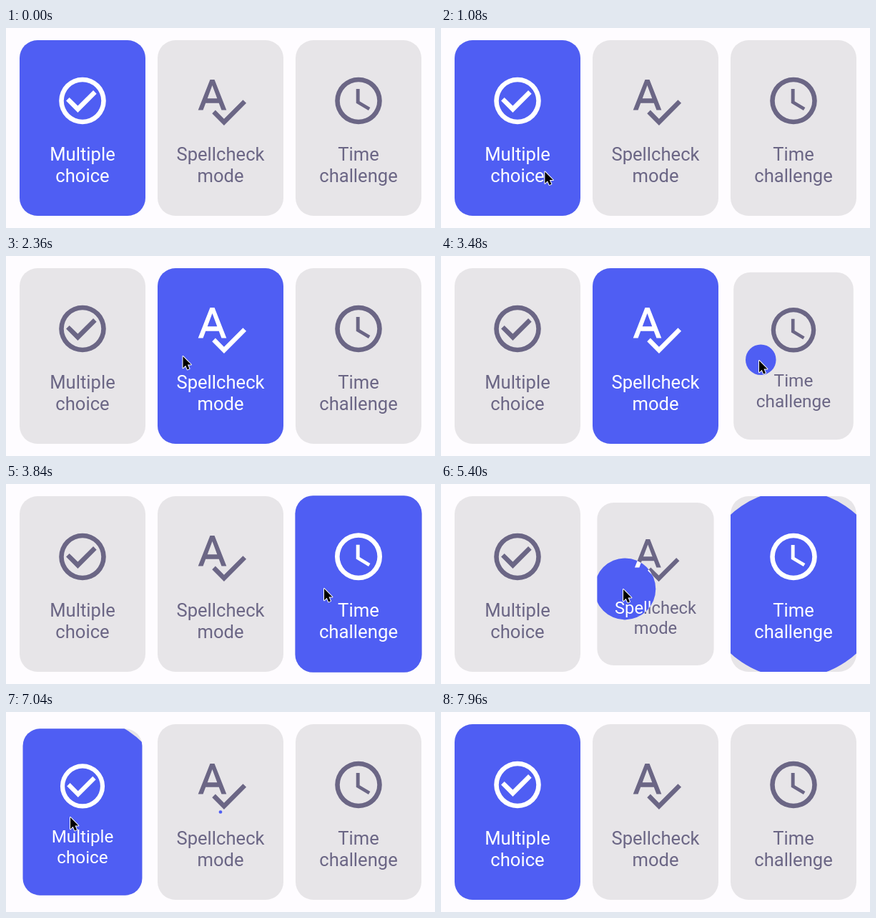
These frames come from a looping animation (600 by 279 pixels, 8.52 s). An HTML page:

```html
<!DOCTYPE html>
<html lang="en">
<head>
<meta charset="utf-8">
<title>Mode picker</title>
<style>
  html, body { margin: 0; width: 100%; height: 100%; overflow: hidden; background: #fefcff; }
  svg { display: block; width: 100%; height: 100%; }
  text { font: 25.6px Roboto, sans-serif; text-anchor: middle; }
  .idle { fill: #6b6685; }
  .idle rect { fill: #e7e5e8; }
  .active { fill: #fff; }
  .active rect { fill: #4f5ef3; }
</style>
</head>
<body>
<svg id="stage" viewBox="0 0 600 279">
  <g id="cards"></g>
  <path id="cursor" d="M0 0V16.2L3.7 12.7 6.2 18.4 9 17.2 6.5 11.6H11.4Z"
        fill="#000" stroke="#fff" stroke-width="2" paint-order="stroke" stroke-linejoin="round"/>
</svg>
<script>
const LOOP = 8520, STEP = 40;
const WIDTH = 176, HEIGHT = 245, MID_Y = 139.5;
const RING = 'M12 2a10 10 0 1 0 0 20 10 10 0 1 0 0-20zm0 18a8 8 0 1 1 0-16 8 8 0 1 1 0 16z';

const cards = [
  { x: 107, lines: ['Multiple', 'choice'],
    icon: RING + 'M16.59 7.58 10 14.17l-3.59-3.58L5 12l5 5 8-8z' },
  { x: 300, lines: ['Spellcheck', 'mode'],
    icon: 'M12.45 16h2.09L9.43 3H7.57L2.46 16h2.09l1.12-3h5.64l1.14 3zm-6.02-5L8.5 5.48 10.57 11H6.43z' +
          'm15.16.59-8.09 8.09L9.83 16l-1.41 1.41 5.09 5.09L23 13z' },
  { x: 493, lines: ['Time', 'challenge'],
    icon: RING + 'M12.5 7H11v6l5.25 3.15.75-1.23-4.5-2.67z' }
];

const clicks = [
  { at: 1565, card: 1, x: 247, y: 140 },
  { at: 3398, card: 2, x: 445, y: 145 },
  { at: 5282, card: 1, x: 254, y: 147 },
  { at: 6825, card: 0, x: 90, y: 147 }
];

// [time, x, y] of the pointer tip
const route = [
  [800, 82, 238], [1440, 247.5, 140], [2440, 247.5, 140], [3100, 445, 146],
  [4220, 445, 146], [5000, 255, 147], [5900, 255, 147], [6700, 90, 147],
  [7120, 90, 147], [7560, 150, 290]
];

// [time since click, scale]
const press = [[0, 1], [150, .92], [330, 1.028], [500, 1]];

const clamp = u => Math.min(1, Math.max(0, u));
const ease = u => {
  u = clamp(u);
  return u < .5 ? 2 * u * u : 1 - 2 * (1 - u) ** 2;
};

function along(keys, t) {
  if (t <= keys[0][0]) return keys[0].slice(1);
  for (let i = 1; i < keys.length; i++) {
    const [t0, ...from] = keys[i - 1], [t1, ...to] = keys[i];
    if (t < t1) {
      const e = ease((t - t0) / (t1 - t0));
      return from.map((v, j) => v + (to[j] - v) * e);
    }
  }
  return keys[keys.length - 1].slice(1);
}

const face = ({ x, lines, icon }) => `
  <rect x="${x - WIDTH / 2}" y="${MID_Y - HEIGHT / 2}" width="${WIDTH}" height="${HEIGHT}" rx="25"/>
  <path d="${icon}" fill-rule="evenodd" transform="translate(${x} 101.5) scale(3.28) translate(-12 -12)"/>
  ${lines.map((line, i) => `<text x="${x}" y="${184.5 + 30 * i}">${line}</text>`).join('')}`;

document.getElementById('cards').innerHTML = cards.map((card, i) => `
  <g class="card">
    <clipPath id="fill${i}"><circle/></clipPath>
    <g class="idle">${face(card)}</g>
    <g class="active" clip-path="url(#fill${i})">${face(card)}</g>
  </g>`).join('');

const groups = [...document.querySelectorAll('.card')];
const circles = groups.map(g => g.querySelector('circle'));
const overlays = groups.map(g => g.querySelector('.active'));
const cursor = document.getElementById('cursor');

function draw(t) {
  const state = cards.map((card, i) => ({ x: card.x, y: MID_Y, r: i ? 0 : 300, scale: 1 }));
  let selected = 0;
  for (const { at, card, x, y } of clicks) {
    const age = t - at;
    if (age < 0) break;
    state[selected] = { x: cards[selected].x, y: MID_Y, r: 276 * (1 - ease(age / 230)), scale: 1 };
    state[card] = { x, y, r: 266 * ease(age / 400), scale: along(press, age)[0] };
    selected = card;
  }
  state.forEach(({ x, y, r, scale }, i) => {
    const cx = cards[i].x;
    groups[i].setAttribute('transform',
      `translate(${cx} ${MID_Y}) scale(${scale}) translate(${-cx} ${-MID_Y})`);
    circles[i].setAttribute('cx', x);
    circles[i].setAttribute('cy', y);
    circles[i].setAttribute('r', r);
    overlays[i].style.display = r > 0 ? '' : 'none';
  });
  const visible = t >= route[0][0] && t < route[route.length - 1][0];
  cursor.style.display = visible ? '' : 'none';
  cursor.setAttribute('transform', `translate(${along(route, t).join(' ')})`);
}

const start = performance.now();
function tick() {
  const t = (performance.now() - start) % LOOP;
  draw(Math.floor(t / STEP) * STEP);
  requestAnimationFrame(tick);
}
tick();
</script>
</body>
</html>
```
